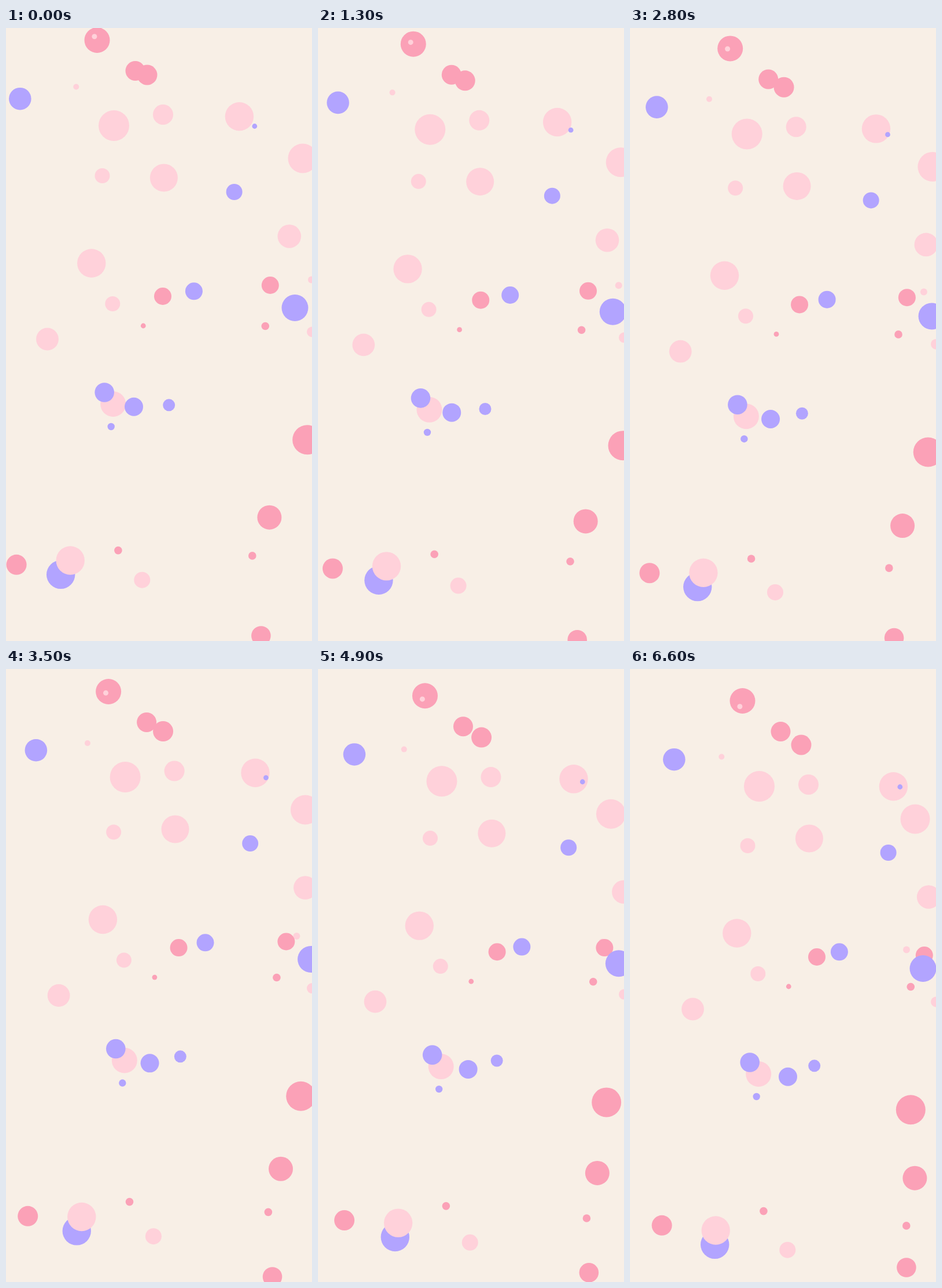
Recreate the animation shown at these times as an HTML page with a canvas. Size 529 by 1058 pixels, loop 6700 ms.

```html
<!DOCTYPE html>
<html lang="en">
<head>
<meta charset="utf-8">
<title>Drifting dots</title>
<style>
  html, body { margin: 0; width: 100%; height: 100%; overflow: hidden; background: #f8efe6; }
  canvas { display: block; }
</style>
</head>
<body>
<canvas width="529" height="1058"></canvas>
<script>
const W = 529, H = 1058, STEP = 100, STEPS = 67;
const SLOW = [37, 34], FAST = [52, 50]; // drift in x and y over one loop
const BG = '#f8efe6', PALE = '#ffd1da', PINK = '#fba1b7', VIOLET = '#b2a4ff';
const ctx = document.querySelector('canvas').getContext('2d');

// Layers from back to front. Dots are [x, y, radius] at mid-loop, in four groups:
// slow, fast down, fast across, fast both.
const layers = [
  [PALE, [
    [[205, 185.5, 26.5], [291.4, 275.5, 24]],
    [[139.8, 126.5, 5], [290, 174.5, 17.5], [185, 280, 13], [166.3, 431, 24.7], [202.8, 501, 13],
      [90, 562, 19.4], [203.7, 674, 22], [560, 549.5, 9], [253.8, 977.7, 14]],
    [[539, 242, 25.5], [515.8, 376.5, 20.3]],
    [[429.4, 177.7, 24.7], [554, 459.4, 6]]
  ]],
  [PINK, [
    [[176, 38, 22], [242, 91, 17], [255.8, 531, 4.4], [466.8, 531.5, 6.8], [473.9, 861.7, 21],
      [36.6, 943.3, 17.5], [212.4, 918.6, 6.8], [459.4, 1066, 16.8]],
    [],
    [[297, 480, 15]],
    [[270, 106, 17.5], [482.8, 469, 15], [546.7, 735.8, 25.5], [451.8, 935.9, 6.8]]
  ]],
  [VIOLET, [
    [[448.3, 186.5, 4.4], [343.4, 471.3, 15], [300.2, 667.8, 10.5]],
    [[188.7, 654, 16.8], [200.2, 713, 6.2]],
    [[50.3, 139.2, 19.3], [420.6, 300, 14], [525.5, 500, 23]],
    [[247, 678.8, 16], [120.7, 968.4, 24.7]]
  ]],
  [PALE, [
    [],
    [[171.4, 39.8, 4.5], [129.7, 944, 24.7]]
  ]]
];

// Centres bounce off the far edge; one that starts outside stays stuck to it.
function place(mid, drift, p, max) {
  if (mid - drift / 2 > max) return max;
  const v = mid + drift * (p - 0.5);
  return v > max ? 2 * max - v : v;
}

function draw(now) {
  const p = Math.floor(now / STEP) % STEPS / (STEPS - 1);
  ctx.fillStyle = BG;
  ctx.fillRect(0, 0, W, H);
  for (const [color, groups] of layers) {
    ctx.fillStyle = color;
    groups.forEach((dots, i) => {
      const dx = (i & 2 ? FAST : SLOW)[0], dy = (i & 1 ? FAST : SLOW)[1];
      for (const [x, y, r] of dots) {
        ctx.beginPath();
        ctx.arc(place(x, dx, p, W), place(y, dy, p, H), r, 0, 2 * Math.PI);
        ctx.fill();
      }
    });
  }
}

const start = performance.now();
function tick() {
  draw(performance.now() - start);
  requestAnimationFrame(tick);
}
tick();
</script>
</body>
</html>
```
